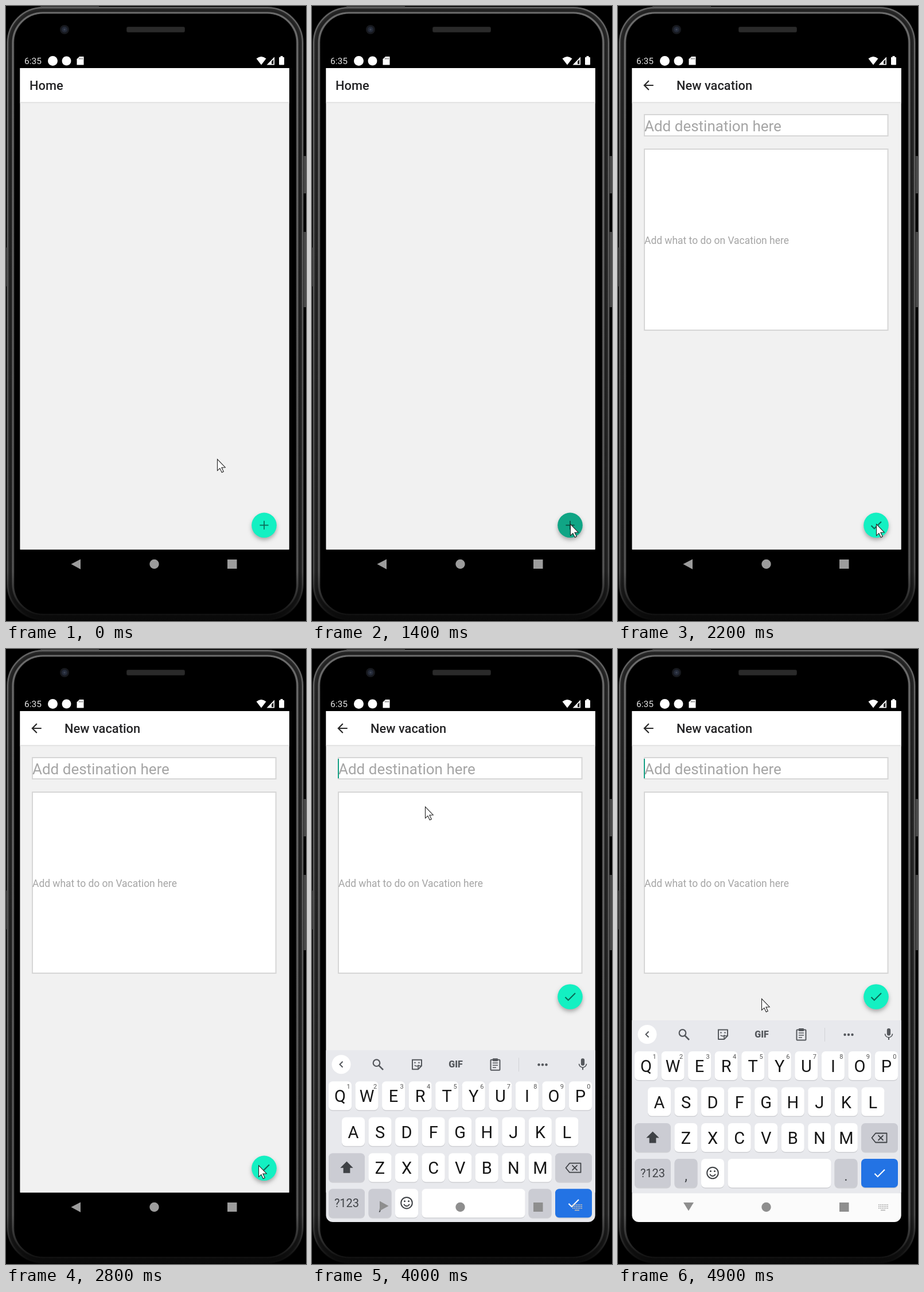
Write an HTML page with a canvas that moves like this. It is 523 px wide and 1070 px high and loops after 5000 ms.

```html
<!DOCTYPE html>
<html lang="en">
<head>
<meta charset="utf-8">
<title>Vacation planner demo</title>
<style>
html, body { margin: 0; width: 100%; height: 100%; overflow: hidden; background: #000; }
canvas { display: block; width: 100vw; height: 100vh; }
</style>
</head>
<body>
<canvas id="stage" width="523" height="1070"></canvas>
<script>
const c = document.getElementById('stage').getContext('2d');
const LOOP = 5000, STEP = 100;
const SCREEN = { x: 24.4, y: 108, w: 469.3, h: 837.7 };
const HEADER_END = 167;
const MINT = [19, 240, 194], MINT_DOWN = [16, 165, 133];
const KEY_PITCH = 46.55;

const CHECK = new Path2D('M9 16.2 4.8 12 3.4 13.4 9 19 21 7 19.6 5.6z');
const PLUS = new Path2D('M19 12.800h-6.200V19h-1.600v-6.200H5v-1.600h6.200V5h1.600v6.200H19z');
const BACK = new Path2D('M20 11H7.83l5.59-5.59L12 4l-8 8 8 8 1.41-1.41L7.83 13H20z');
const SHIFT = new Path2D('M12 3 2.5 12.5H7V20h10v-7.500h4.500z');
const MIC = new Path2D('M12 14a3 3 0 0 0 3-3V5a3 3 0 0 0-6 0v6a3 3 0 0 0 3 3zm5.300-3a5.300 5.300 0 0 1-10.600 0H5a7 7 0 0 0 6 6.700V21h2v-3.300A7 7 0 0 0 19 11z');
const ARROW = new Path2D('M.5.5V20.300l4.400-4 3.400 7.200 3-1.400-3.400-7 6.300-.4z');

// time, x, y of the pointer tip
const POINTER = [
  [0, 368, 788], [300, 425, 866], [500, 450, 901], [2700, 450, 901], [2800, 440, 898],
  [3000, 380, 776], [3400, 212, 232], [3500, 206, 208], [3700, 206, 208], [4100, 194, 296],
  [4200, 215, 360], [4500, 462, 890], [4600, 473, 916], [4800, 451, 912], [4900, 250, 608]
];

const clamp = v => Math.max(0, Math.min(1, v));
const ramp = (t, a, b) => clamp((t - a) / (b - a));

function box(x, y, w, h, r, fill) {
  c.beginPath();
  c.roundRect(x, y, w, h, r);
  if (fill) { c.fillStyle = fill; c.fill(); }
}

function disc(x, y, r, fill) {
  c.beginPath();
  c.arc(x, y, r, 0, Math.PI * 2);
  c.fillStyle = fill;
  c.fill();
}

function poly(pts, fill) {
  c.beginPath();
  pts.forEach(([x, y]) => c.lineTo(x, y));
  c.closePath();
  c.fillStyle = fill;
  c.fill();
}

function line(pts, color, width) {
  c.beginPath();
  pts.forEach(([x, y]) => c.lineTo(x, y));
  c.strokeStyle = color;
  c.lineWidth = width;
  c.stroke();
}

function text(s, x, y, size, color, weight = 400, align = 'left') {
  c.font = `${weight} ${size}px Roboto, Arial, sans-serif`;
  c.textAlign = align;
  c.fillStyle = color;
  c.fillText(s, x, y);
}

// icon on a 24 unit grid, centred at x, y
function icon(path, x, y, scale, color) {
  c.save();
  c.translate(x, y);
  c.scale(scale, scale);
  c.translate(-12, -12);
  c.fillStyle = color;
  c.fill(path);
  c.restore();
}

function fade(top, bottom) {
  const g = c.createLinearGradient(0, 0, 0, 1070);
  g.addColorStop(0, top);
  g.addColorStop(0.92, bottom);
  g.addColorStop(1, '#080808');
  return g;
}

function rim(inset, color, width) {
  box(inset, inset, 520 - inset * 2, 1070 - inset * 2, 64 - inset);
  c.strokeStyle = color;
  c.lineWidth = width;
  c.stroke();
}

function phone() {
  c.fillStyle = '#000';
  c.fillRect(0, 0, 523, 1070);
  box(517, 261, 7, 65, 2, '#484848');
  box(517, 393, 7, 131, 2, '#484848');
  box(0, 420, 3, 68, 1, '#444');
  box(1, 1, 518, 1068, 63, fade('#2c2c2c', '#282828'));
  rim(3, fade('#6a6a6a', '#4e4e4e'), 2);
  rim(8, fade('#222', '#1e1e1e'), 4);
  rim(12, fade('#6c6c6c', '#545454'), 3);
  box(14.5, 13.5, 491, 1044, 50, '#000');
  line([[60, 0.5], [162, 0.5]], '#4a4a4a', 1);
  disc(102, 41, 8, '#17191e');
  disc(102, 41, 5, '#242a38');
  disc(102, 41, 1.800, '#3c4250');
  box(210, 36, 102, 10, 3, '#202020');
  box(211, 37, 100, 8, 2, '#2a2a2a');
}

function statusBar() {
  text('6:35', 32, 100.800, 15.5, '#e6e6e6');
  disc(81.5, 95.5, 8.5, '#fff');
  disc(105.5, 95.5, 8, '#fff');
  poly([[128, 88], [135.5, 88], [135.5, 102.5], [123.5, 102.5], [123.5, 92.5]], '#fff');
  c.fillStyle = '#777';
  [127, 129.600, 132.200].forEach(x => c.fillRect(x, 90, 1.300, 3));

  c.beginPath();
  c.moveTo(445, 102.5);
  c.lineTo(436.5, 91.5);
  c.quadraticCurveTo(445, 84.5, 453.5, 91.5);
  c.closePath();
  c.fillStyle = '#fff';
  c.fill();

  poly([[468, 88.5], [468, 102.5], [454.5, 102.5]], '#fff');
  poly([[466.300, 93], [466.300, 101], [463, 101], [463, 96.300]], '#111');
  box(476, 89, 9, 13.5, 1, '#fff');
  c.fillRect(478.5, 87, 4, 3);
}

function fab(y, glyph, press) {
  const rgb = MINT.map((v, i) => Math.round(v + (MINT_DOWN[i] - v) * press));
  c.save();
  c.shadowColor = 'rgba(0,0,0,.3)';
  c.shadowBlur = 7;
  c.shadowOffsetY = 4;
  disc(450, y, 21.800, `rgb(${rgb})`);
  c.restore();
  icon(glyph, 450, y, 1.080, 'rgba(0,0,0,.55)');
}

function field(y, h) {
  c.fillStyle = '#d6d6d6';
  c.fillRect(45, y, 426.5, h);
  c.fillStyle = '#fff';
  c.fillRect(47, y + 2, 422.5, h - 4);
}

function pageBase() {
  const { x, y, w, h } = SCREEN;
  c.fillStyle = '#f1f1f1';
  c.fillRect(x, y, w, h);
  c.fillStyle = '#e9e9e9';
  c.fillRect(x, HEADER_END, w, 2.5);
  c.fillStyle = '#dedede';
  c.fillRect(x, HEADER_END, w, 1);
  c.fillStyle = '#fff';
  c.fillRect(x, y, w, HEADER_END - y);
}

function title(s, x) {
  text(s, x, 146.300, 21.850, '#242426', 500);
}

function homePage(t) {
  pageBase();
  title('Home', 41);
  fab(903.300, PLUS, ramp(t, 1100, 1300));
}

function editPage(t) {
  pageBase();
  icon(BACK, 53, 138, 1.090, '#2a2a2a');
  title('New vacation', 102);
  field(188, 39);
  field(248, 317);
  text('Add destination here', 46, 217.5, 26, '#a5a5a5');
  text('Add what to do on Vacation here', 46, 413.5, 17.450, '#a5a5a5');
  const focused = t >= 3900;
  if (focused && Math.floor((t - 3900) / 500) % 2 === 0) {
    c.fillStyle = '#129f83';
    c.fillRect(45, 191, 2, 34);
  }
  fab(focused ? 605 : 903.300, CHECK, 0);
}

function zoomed(scale, alpha, draw) {
  const cx = SCREEN.x + SCREEN.w / 2, cy = SCREEN.y + SCREEN.h / 2;
  c.save();
  c.globalAlpha = alpha;
  c.translate(cx, cy);
  c.scale(scale, scale);
  c.translate(-cx, -cy);
  draw();
  c.restore();
}

function pages(t) {
  c.save();
  c.beginPath();
  c.rect(SCREEN.x, SCREEN.y, SCREEN.w, SCREEN.h);
  c.clip();
  c.fillStyle = '#fff';
  c.fillRect(SCREEN.x, SCREEN.y, SCREEN.w, SCREEN.h);
  const p = 1 - Math.pow(1 - ramp(t, 1500, 1900), 4.400);
  if (p < 0.9) zoomed(1 + 0.1 * p, 1 - p * 0.7, () => homePage(t));
  if (p > 0) zoomed(0.85 + 0.15 * p, clamp(p * 1.100), () => editPage(t));
  c.restore();
}

function key(x, y, w, fill = '#fff') {
  box(x, y + 1.5, w, 50, 7, '#cfd0d4');
  box(x, y, w, 50, 7, fill);
}

function letters(row, x, y, numbered) {
  [...row].forEach((ch, i) => {
    const cx = x + i * KEY_PITCH;
    key(cx - 20, y, 40);
    text(ch, cx, y + 36, 29, '#161616', 400, 'center');
    if (numbered) text((i + 1) % 10, cx + 14.5, y + 13, 11, '#555', 400, 'center');
  });
}

function toolbar() {
  const ink = '#55585d';
  disc(51, 670.5, 16.5, '#fff');
  line([[53.5, 665.5], [48.5, 670.5], [53.5, 675.5]], ink, 2);

  c.strokeStyle = ink;
  c.lineWidth = 2.200;
  c.beginPath();
  c.arc(112.5, 668, 5.800, 0, 7);
  c.stroke();
  line([[116.5, 672.5], [124, 680]], ink, 2.600);

  c.lineJoin = 'round';
  line([[175, 662.5], [191, 662.5], [191, 673], [185, 679], [175, 679], [175, 661.5]], ink, 2);
  line([[185, 679], [185, 673], [191, 673]], ink, 1.600);
  disc(179.5, 667.5, 1.200, ink);
  disc(186.5, 667.5, 1.200, ink);
  c.beginPath();
  c.arc(182.5, 669, 4.5, 0.6, 2.500);
  c.lineWidth = 1.5;
  c.stroke();

  text('GIF', 250.5, 676, 16, ink, 900, 'center');

  box(311.5, 662.5, 16, 18, 1);
  c.lineWidth = 2;
  c.stroke();
  box(315, 660, 9, 5, 1, ink);
  [668, 672, 676].forEach((y, i) => line([[315, y], [i < 2 ? 324 : 321, y]], ink, 1.600));

  line([[360.5, 659], [360.5, 683]], '#d2d3d7', 1);
  [395.5, 402, 408.5].forEach(x => disc(x, 671, 2.200, ink));
  icon(MIC, 472, 670.5, 1.050, ink);
}

function keyboard(shift) {
  c.save();
  box(SCREEN.x, 107, SCREEN.w, 890, [0, 0, 12, 12]);
  c.clip();
  c.translate(0, shift);
  c.fillStyle = '#e8e9ed';
  c.fillRect(24, 646, 470, 301);
  c.fillStyle = '#fbfbfb';
  c.fillRect(24, 947, 470, 60);
  toolbar();
  letters('QWERTYUIOP', 49, 700, true);
  letters('ASDFGHJKL', 72, 762.5);
  letters('ZXCVBNM', 118.5, 825);

  const gray = '#cbccd3', ink = '#3f4246';
  key(29, 825, 63, gray);
  icon(SHIFT, 60.5, 850, 1.180, ink);
  key(424, 825, 64, gray);
  c.lineJoin = 'round';
  line([[442.5, 850.5], [449, 842.5], [468.5, 842.5], [468.5, 858.5], [449, 858.5], [442.5, 850.5], [449, 842.5]], ink, 1.800);
  line([[453.5, 846], [462.5, 855]], ink, 1.800);
  line([[462.5, 846], [453.5, 855]], ink, 1.800);

  key(29, 887, 63, gray);
  text('?123', 60.5, 919, 20, ink, 400, 'center');
  key(98.5, 887, 40, gray);
  text(',', 118.5, 925, 24, ink, 400, 'center');
  key(145, 887, 40);
  c.beginPath();
  c.arc(165, 911.5, 9.800, 0, 7);
  c.strokeStyle = ink;
  c.lineWidth = 2;
  c.stroke();
  disc(161.5, 908.5, 1.5, ink);
  disc(168.5, 908.5, 1.5, ink);
  c.beginPath();
  c.arc(165, 912, 5, 0.3, 2.840);
  c.stroke();
  key(191.5, 887, 180);
  key(377.5, 887, 40, gray);
  text('.', 397.5, 925, 24, ink, 400, 'center');
  key(424, 887, 64, '#2373e4');
  icon(CHECK, 456, 912, 1.080, '#fff');
  c.restore();
}

function navBar(t, light) {
  const ink = light ? '#8e8e8e' : '#9c9c9c';
  if (t < 4000) poly([[113.5, 971], [130, 962.5], [130, 980]], ink);
  else if (t < 4200) poly([[118, 960.5], [133.5, 969], [118, 977.5]], ink);
  else poly([[114, 963], [132, 963], [123, 977.5]], ink);
  disc(258.5, 971, 8.200, ink);
  c.fillStyle = ink;
  c.fillRect(386, 963, 16.5, 16);
  if (!light) return;
  c.fillStyle = '#b9b9b9';
  for (let row = 0; row < 3; row++)
    for (let col = 0; col < 6; col++) c.fillRect(454 + col * 3, 966 + row * 3, 1.900, 1.900);
  c.fillRect(458, 975.5, 8, 1.800);
}

function pointer(t) {
  let i = POINTER.findIndex(k => k[0] > t);
  if (i < 0) i = POINTER.length;
  const a = POINTER[i - 1], b = POINTER[i] || a;
  const p = a === b ? 0 : ramp(t, a[0], b[0]);
  c.save();
  c.translate(a[1] + (b[1] - a[1]) * p, a[2] + (b[2] - a[2]) * p);
  c.fillStyle = '#fff';
  c.fill(ARROW);
  c.strokeStyle = '#222';
  c.lineWidth = 1.100;
  c.lineJoin = 'miter';
  c.stroke(ARROW);
  c.restore();
}

function draw(t) {
  phone();
  statusBar();
  pages(t);
  const rise = ramp(t, 3900, 4200);
  if (rise > 0) keyboard(351 * Math.pow(1 - rise, 4.700));
  navBar(t, rise > 0);
  pointer(t);
}

const start = performance.now();
function tick() {
  const t = (performance.now() - start) % LOOP;
  draw(Math.floor(t / STEP) * STEP);
  requestAnimationFrame(tick);
}
tick();
</script>
</body>
</html>
```
